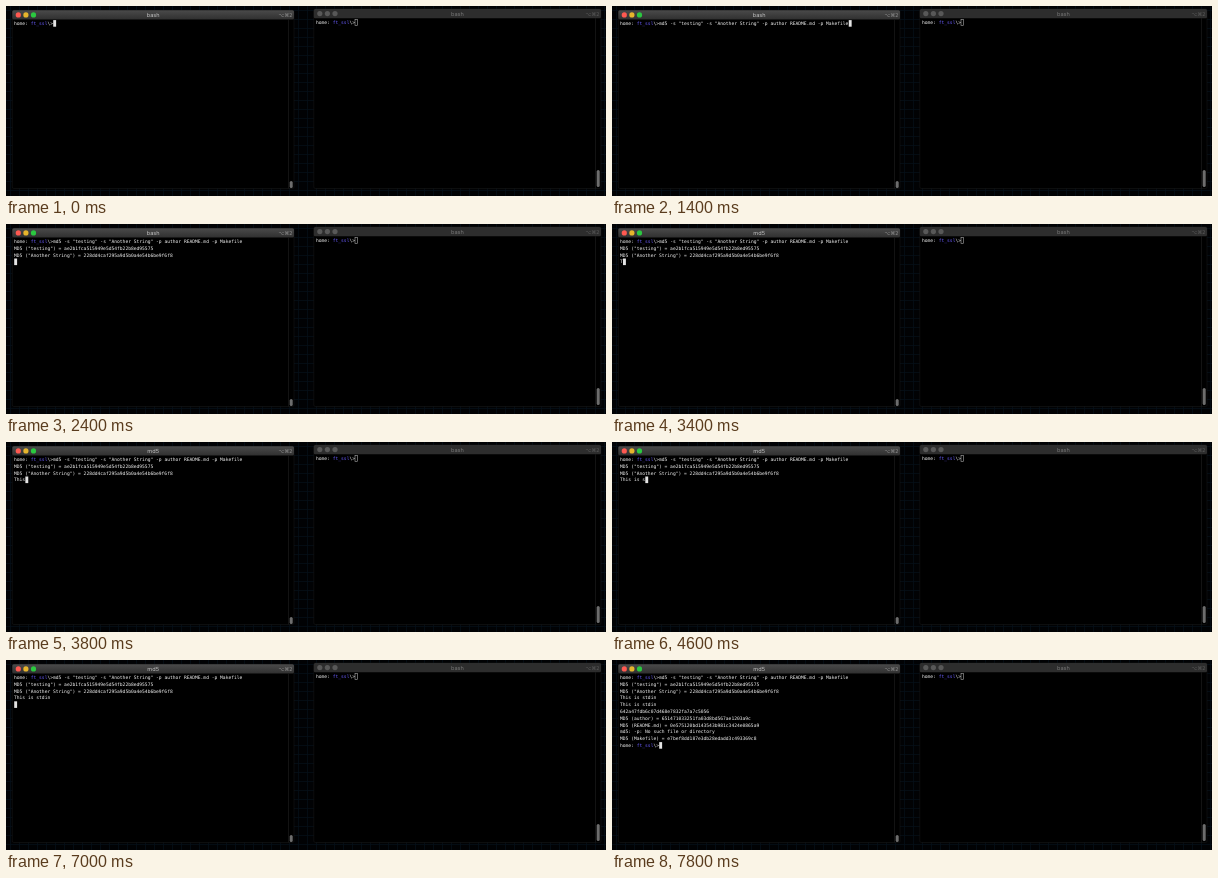
Animation, 600 px wide and 190 px high, one loop 8000 ms. Source, as an HTML page:

```html
<!DOCTYPE html>
<html>
<head>
<meta charset="utf-8">
<style>
html, body { margin: 0; width: 100%; height: 100%; overflow: hidden; background: #000; }
svg { display: block; text-rendering: geometricPrecision; }
.term { font: 4.63px "DejaVu Sans Mono", monospace; fill: #f4f4f4; white-space: pre; }
.dir { fill: #6a5cff; }
.title { font: 5.6px Inter, "Liberation Sans", sans-serif; text-anchor: middle; }
.keys { font: 5px "DejaVu Sans", sans-serif; text-anchor: end; }
</style>
</head>
<body>
<svg width="600" height="190" viewBox="0 0 600 190">
  <defs>
    <pattern id="grid" width="9" height="9" patternUnits="userSpaceOnUse">
      <path d="M4.5 0V9M0 4.5H9" stroke="#06101a" stroke-width=".7"/>
    </pattern>
    <linearGradient id="bar" x2="0" y2="1">
      <stop stop-color="#4a4a4a"/><stop offset="1" stop-color="#303030"/>
    </linearGradient>
  </defs>
  <rect width="600" height="190" fill="#010204"/>
  <rect width="600" height="190" fill="url(#grid)"/>
  <g id="windows"></g>
  <g id="lines" class="term"></g>
  <rect id="cursor" width="2.9" height="6.6" fill="#e4e4e4"/>
</svg>
<script>
const X = 8, Y = 18.9, ROW = 6.8, COL = 4.63 * 0.602;
const $ = id => document.getElementById(id);
const prompt = 'home: <tspan class="dir">ft_ssl</tspan>\\&gt;';
const PROMPT_LEN = 14;
const command = 'md5 -s "testing" -s "Another String" -p author README.md -p Makefile';
const hashes = [
  'MD5 ("testing") = ae2b1fca515949e5d54fb22b8ed95575',
  'MD5 ("Another String") = 228dd4caf295a9d5b0a4e54b6be9f6f8'
];
const input = 'This is stdin';
const output = [
  input,
  '642a47fdb6c07d468e7832fa7a7c5056',
  'MD5 (author) = 651471033251fa03d8bd567ae1203a9c',
  'MD5 (README.md) = 0e575120bd143543b981c3424e0865a9',
  'md5: -p: No such file or directory',
  'MD5 (Makefile) = e7bef8dd187e3db28edadd3c493369c8'
];
// [time, characters typed on standard input]
const keys = [[3400, 1], [3600, 2], [3800, 4], [4000, 5], [4200, 7],
  [4400, 8], [4600, 9], [4800, 10], [5000, 11], [5400, 13]];

function frame(x, y, w, bar, lights, ink, id, thumbY, thumbH) {
  const dots = lights.map((c, i) =>
    `<circle cx="${x + 6 + i * 7.6}" cy="${y + 4.6}" r="2.6" fill="${c}"/>`).join('');
  return `<rect x="${x}" y="${y}" width="${w}" height="${182.5 - y}" rx="1.5" fill="#000" stroke="#1b1b1b" stroke-width=".5"/>
    <rect x="${x}" y="${y}" width="${w}" height="9.2" rx="1.5" fill="${bar}"/>${dots}
    <path d="M${x + w - 5.5} ${y + 9.2}V182.5" stroke="#202020" stroke-width=".6"/>
    <rect x="${x + w - 4.3}" y="${thumbY}" width="3" height="${thumbH}" rx="1.5" fill="#6d6d6d"/>
    <text id="${id}" class="title" x="${x + w / 2}" y="${y + 6.7}" fill="${ink}">bash</text>
    <text class="keys" x="${x + w - 1.5}" y="${y + 6.6}" fill="${ink}" opacity=".65">⌥⌘2</text>`;
}
$('windows').innerHTML =
  frame(6.3, 4.3, 281.7, 'url(#bar)', ['#ff5951', '#e6b52c', '#2bc840'], '#c4c4c4', 'title', 175, 7) +
  frame(307.8, 3, 287.2, '#2d2d2d', Array(3).fill('#585858'), '#777', 'idle', 164, 17) +
  `<text class="term" x="310" y="17.9">${prompt}</text>
   <rect x="349" y="13.4" width="2.4" height="6" fill="none" stroke="#aaa" stroke-width=".6"/>`;

function screen(t) {
  if (t < 1400) return { lines: [prompt], col: PROMPT_LEN };
  const lines = [prompt + command];
  if (t < 2400) return { lines, col: PROMPT_LEN + command.length };
  const typed = keys.reduce((n, [at, count]) => t >= at ? count : n, 0);
  lines.push(...hashes, input.slice(0, typed));
  if (t < 7000) return { lines, col: typed };
  if (t < 7800) return { lines: [...lines, ''], col: 0 };
  return { lines: [...lines, ...output, prompt], col: PROMPT_LEN };
}

let shown = '';
function draw(now) {
  const t = now % 8000;
  const { lines, col } = screen(t);
  const html = lines.map((s, i) => `<text x="${X}" y="${Y + i * ROW}">${s}</text>`).join('');
  if (html !== shown) $('lines').innerHTML = shown = html;
  $('title').textContent = t < 3400 ? 'bash' : 'md5';
  $('cursor').setAttribute('x', X + col * COL + 0.2);
  $('cursor').setAttribute('y', 14.1 + (lines.length - 1) * ROW);
  requestAnimationFrame(draw);
}
draw(performance.now());
</script>
</body>
</html>
```
